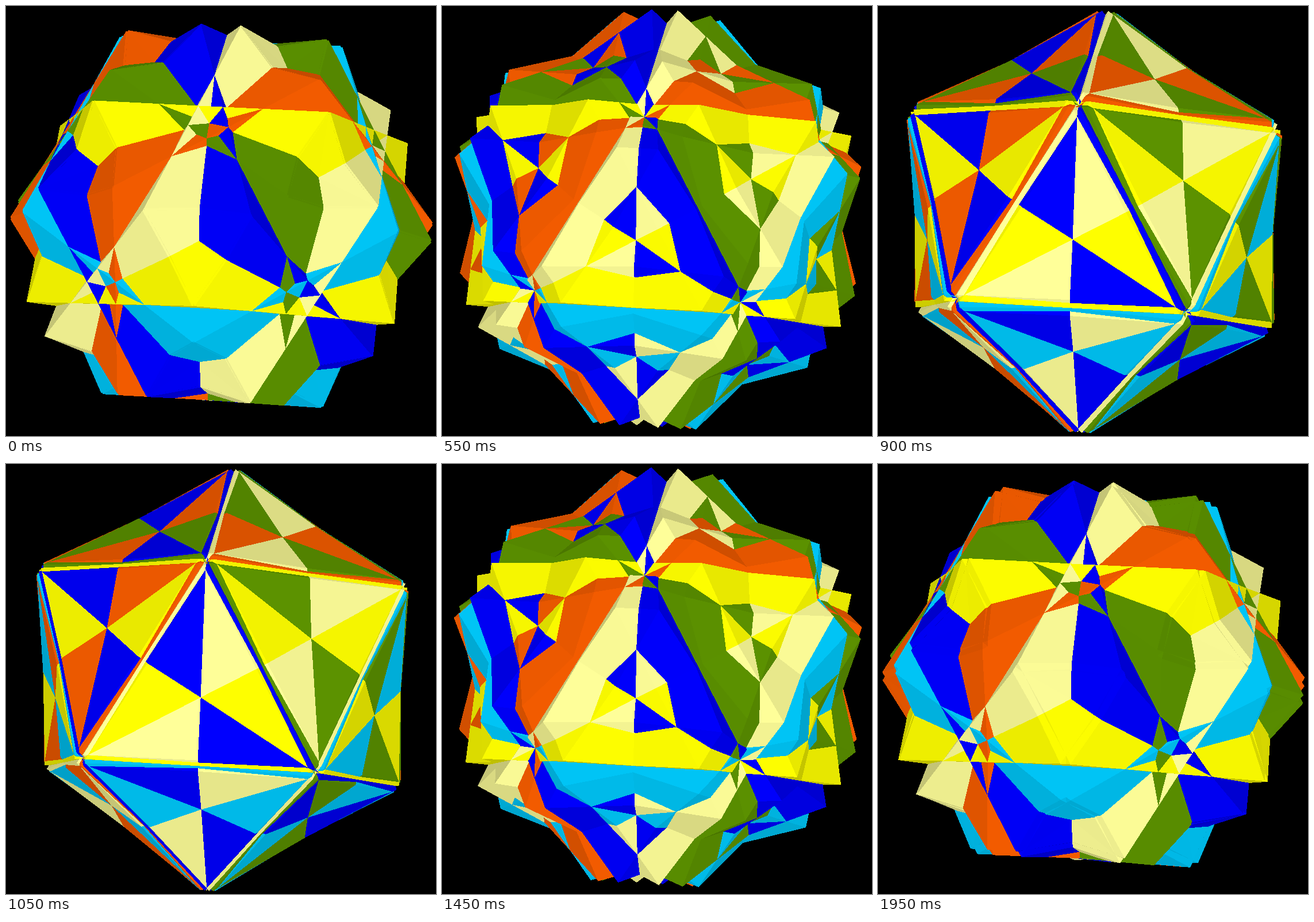
These frames come from a looping animation (748 by 748 pixels, 2 s). An HTML page with a canvas:

```html
<!DOCTYPE html>
<html lang="en">
<head>
<meta charset="utf-8">
<title>Twelve rotating pentagonal antiprisms</title>
<style>
  html, body { margin: 0; width: 100%; height: 100%; overflow: hidden; background: #000; }
  canvas { display: block; }
</style>
</head>
<body>
<canvas id="stage" width="748" height="748"></canvas>
<script>
const SIZE = 748, MID = SIZE / 2;
const SCALE = 367.5;   // pixels per circumradius
const CAM = 10.5;      // camera distance in circumradii
const STEP_MS = 50, STEPS = 40;
const RAD = Math.PI / 180;

const ctx = document.getElementById('stage').getContext('2d');
const image = ctx.createImageData(SIZE, SIZE);
const pixels = new Uint32Array(image.data.buffer);
const depth = new Float32Array(SIZE * SIZE);

const dot = (a, b) => a[0] * b[0] + a[1] * b[1] + a[2] * b[2];
const mix = (a, s, b, t) => a.map((v, i) => v * s + b[i] * t);
const unit = a => a.map(v => v / Math.hypot(...a));
const cross = (a, b) => [
  a[1] * b[2] - a[2] * b[1],
  a[2] * b[0] - a[0] * b[2],
  a[0] * b[1] - a[1] * b[0]
];

// Frame of the face turned to the viewer: normal and two in-plane directions (y points down).
const front = unit([-0.112, 0.1015, 0.9885]);
const down = unit([-0.0425, 0.9934, -0.1068]);
const left = cross(front, down);

// Icosahedron vertex at a height along the front normal, turned about it.
function vertex(height, deg) {
  const r = Math.sqrt(1 - height * height);
  const side = mix(down, Math.cos(deg * RAD), left, Math.sin(deg * RAD));
  return mix(front, height, side, r);
}

const NEAR = 0.794654, FAR = 0.187592;
const solids = [
  { axis: vertex(FAR, 0), color: [255, 255, 0] },
  { axis: vertex(FAR, 120), color: [255, 255, 153] },
  { axis: vertex(FAR, 240), color: [0, 0, 255] },
  { axis: vertex(NEAR, 180), color: [0, 204, 255] },
  { axis: vertex(NEAR, 60), color: [96, 153, 0] },
  { axis: vertex(NEAR, 300), color: [255, 96, 0] }
];

// Zero direction of each axis: towards a neighbouring icosahedron vertex.
solids.forEach((s, i) => {
  const other = solids[(i + 1) % 6].axis;
  const d = dot(s.axis, other);
  s.x = unit(mix(other, Math.sign(d), s.axis, -Math.abs(d)));
  s.y = cross(s.axis, s.x);
});

function shade(color, facing) {
  const k = 0.73 + 0.27 * facing;
  const [r, g, b] = color.map(v => Math.round(v * k));
  return (255 << 24 | b << 16 | g << 8 | r) >>> 0;
}

function drawFace(points, color) {
  const sum = points.reduce((a, p) => mix(a, 1, p, 1), [0, 0, 0]);
  const n = unit(sum);
  const gap = n[2] * CAM - dot(n, points[0]);
  if (gap <= 0) return;

  const paint = shade(color, n[2]);
  const flat = points.map(p => {
    const k = SCALE / (1 - p[2] / CAM);
    return [MID + p[0] * k, MID + p[1] * k];
  });
  const ys = flat.map(p => p[1]);
  const top = Math.max(0, Math.ceil(Math.min(...ys) - 0.5));
  const end = Math.min(SIZE, Math.max(...ys) - 0.5);
  const dx = -n[0] / SCALE / gap;

  for (let y = top; y < end; y++) {
    const cy = y + 0.5;
    let lo = SIZE, hi = 0;
    for (let i = 0; i < flat.length; i++) {
      const a = flat[i], b = flat[(i + 1) % flat.length];
      if ((a[1] <= cy) === (b[1] <= cy)) continue;
      const x = a[0] + (b[0] - a[0]) * (cy - a[1]) / (b[1] - a[1]);
      lo = Math.min(lo, x);
      hi = Math.max(hi, x);
    }
    // Inverse distance is linear across the screen.
    const rowNear = (n[2] * CAM - n[1] * (cy - MID) / SCALE) / gap;
    for (let x = Math.max(0, Math.ceil(lo - 0.5)); x < hi - 0.5; x++) {
      const near = rowNear + dx * (x + 0.5 - MID);
      const at = y * SIZE + x;
      if (near > depth[at]) {
        depth[at] = near;
        pixels[at] = paint;
      }
    }
  }
}

function drawAntiprism({ axis, x, y, color }, turn) {
  const h = Math.sqrt(0.2), r = 2 * h;
  const ring = Array.from({ length: 10 }, (_, j) => {
    const a = (36 * j + turn) * RAD;
    const side = mix(x, Math.cos(a), y, Math.sin(a));
    return mix(axis, j % 2 ? -h : h, side, r);
  });
  ring.forEach((p, j) => drawFace([p, ring[(j + 1) % 10], ring[(j + 2) % 10]], color));
  for (const odd of [0, 1]) drawFace(ring.filter((_, j) => j % 2 === odd), color);
}

function draw(step) {
  const turn = 35.6 - 72 * step / STEPS;
  pixels.fill(0xff000000);
  depth.fill(0);
  for (const s of solids) {
    drawAntiprism(s, turn);
    drawAntiprism(s, -turn);
  }
  ctx.putImageData(image, 0, 0);
}

let shown = -1;
function tick() {
  const step = Math.floor(performance.now() / STEP_MS) % STEPS;
  if (step !== shown) draw(shown = step);
  requestAnimationFrame(tick);
}
tick();
</script>
</body>
</html>
```
